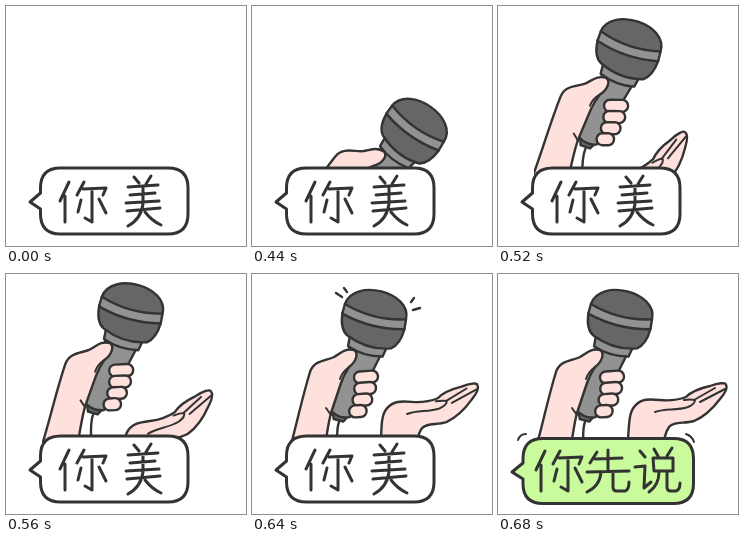
Recreate the animation shown at these times as an HTML page. Size 240x240 px, loop 1.4 s.

```html
<!DOCTYPE html>
<html lang="zh">
<head>
<meta charset="utf-8">
<title>你先说</title>
<style>
  html, body { margin: 0; width: 100%; height: 100%; overflow: hidden; background: #fff; }
  svg { display: block; width: 100vw; height: 100vh; }
  .ink { fill: none; stroke: #333; stroke-width: 2.4; stroke-linecap: round; stroke-linejoin: round; }
  .skin { fill: #fee0dd; }
  .dark { fill: #666; }
  .light { fill: #929292; }
  .bold { stroke-width: 3; }
  .fine { stroke-width: 2; }
</style>
</head>
<body>
<svg viewBox="0 0 240 240" role="img" aria-label="你美 / 你先说">
  <defs>
    <clipPath id="above"><rect x="36" width="204" height="192"/></clipPath>
    <path id="ni" d="M9 1L0 20M5 15V41M24 1L17 14M23 8L46 7L43 14M32 8V41L25 37M21 19L18 31M39 18L46 32"/>
  </defs>
  <rect width="240" height="240" fill="#fff"/>

  <g class="ink" id="scene" clip-path="url(#above)">
    <g id="palm">
      <path class="skin" d="M128 180C132 160 129 142 136 133C143 124 152 125 162 126C172 127 180 126 188 123C194 117 203 114 212 112C220 109 228 108 228 111C230 114 227 119 222 125C216 133 208 142 196 147C186 150 176 147 171 153Q166 160 164 180Z"/>
      <path class="fine" d="M157 138C168 134 178 137 190 133Q197 130 197 126Q193 125 186 126M196 126L217 114M202 128L227 115"/>
    </g>
    <g id="arm">
      <path d="M87 148Q84 156 86 178"/>
      <g transform="translate(122 45) rotate(15)">
        <path class="dark" d="M-16 100L-13 107H-3L0 101Z"/>
        <path class="light" d="M-16 32L-19 99Q-8 106 2 101L16 32Z"/>
        <path class="light" d="M-19 22L-18 33Q0 39 18 34L20 22Z"/>
        <path class="dark" d="M-32 2C-31 12-28 20-21 23Q2 32 24 24C29 20 32 12 32 2Z"/>
        <path class="light" d="M-32-7L-32 3Q0 11 32 2L31-8Z"/>
        <path class="dark" d="M-32-7C-30-35 30-36 31-8Q0 2-32-7Z"/>
      </g>
      <path class="skin" d="M36 182C46 145 50 124 58 98C62 86 74 87 82 83C89 79 93 74 102 76C107 79 104 88 97 93C93 99 91 103 89 109L79 139Q76 150 72 180Z"/>
      <path class="fine" d="M97 93Q90 98 88 105M74 134L79 141"/>
      <g class="skin" id="fingers"></g>
    </g>
  </g>

  <g class="ink bold" id="first">
    <path id="white" fill="#fff"/>
    <use href="#ni" x="54" y="175"/>
    <path d="M128 171L133 177M145 170L140 178M122 181L152 179M124 189L149 187M120 197L153 195M137 180V197M121 205L154 202M137 198Q135 213 122 220M139 206Q146 215 155 219"/>
  </g>

  <g class="ink bold" id="second">
    <path id="green" fill="#c9fb9c"/>
    <use href="#ni" x="38" y="176"/>
    <path d="M99 178L92 189M97 185L124 184M110 176V197M89 198L131 197M103 198Q102 212 89 218M115 198V213Q115 217 119 217H127Q131 216 131 208"/>
    <path d="M142 177L147 183M137 193L147 192L146 214L153 208M156 175L160 182M174 174L169 182M155 184H175V197H156ZM161 198Q161 211 151 218M169 198V213Q169 217 173 217H178Q182 216 182 209"/>
    <path class="fine" d="M20 166Q22 160 28 160M188 160Q194 162 196 168"/>
  </g>

  <path class="ink" id="sparks" d="M95 18l-3-4M90 23l-6-4M159 28l3-4M161 36l7-2"/>
</svg>
<script>
const LOOP = 1400, START = 440, STEP = 40, LAST = 6;
const $ = id => document.getElementById(id);

// rounded box with a small tail on its left side
function bubble(x, y, w, h, tail) {
  const r = 20, side = h - 2 * r, mid = y + h / 2;
  return `M${x + r} ${y}h${w - 2 * r}q${r} 0 ${r} ${r}v${side}q0 ${r} ${-r} ${r}` +
    `h${2 * r - w}q${-r} 0 ${-r} ${-r}V${mid + 8}l${-tail} -7L${x} ${mid - 8}V${y + r}q0 ${-r} ${r} ${-r}Z`;
}
$("white").setAttribute("d", bubble(34.5, 162, 147.5, 66, 10.5));
$("green").setAttribute("d", bubble(25, 164.5, 170.5, 65, 11));

let fingers = "";
for (let i = 0; i < 4; i++) {
  const w = 24 - 2.2 * i;
  fingers += `<rect x="${-w / 2}" y="-6" width="${w}" height="12" rx="5.8"
    transform="translate(${114 - 0.9 * i * i} ${103 + 11.4 * i}) rotate(-4)"/>`;
}
$("fingers").innerHTML = fingers;

// shift by dx, dy and turn about the point px, py
function place(el, dx, dy, angle, px, py) {
  el.setAttribute("transform", `translate(${dx} ${dy}) rotate(${angle} ${px} ${py})`);
}

function show(el, on) {
  el.style.display = on ? "" : "none";
}

function render(time) {
  const step = Math.min(LAST, Math.floor((time % LOOP - START) / STEP));
  show($("scene"), step >= 0);
  show($("first"), step < LAST);
  show($("second"), step === LAST);
  show($("sparks"), step === LAST - 1);
  if (step < 0) return;

  // the microphone swings up, overshoots and settles one step early
  const left = Math.max(0, 1 - step / (LAST - 1));
  const swing = left ** 3;
  const lift = left ** 2.5 * Math.cos(0.84 * step);
  place($("arm"), 40 * swing, 79 * lift, 21 * swing, 122, 45);

  // the open hand slides out and flattens
  const rest = 1 - step / LAST;
  place($("palm"), -91 * rest ** 2, 52 * rest ** 3, -52 * rest ** 2, 228, 112);
}

const begin = performance.now();
function tick() {
  render(performance.now() - begin);
  requestAnimationFrame(tick);
}
tick();
</script>
</body>
</html>
```
